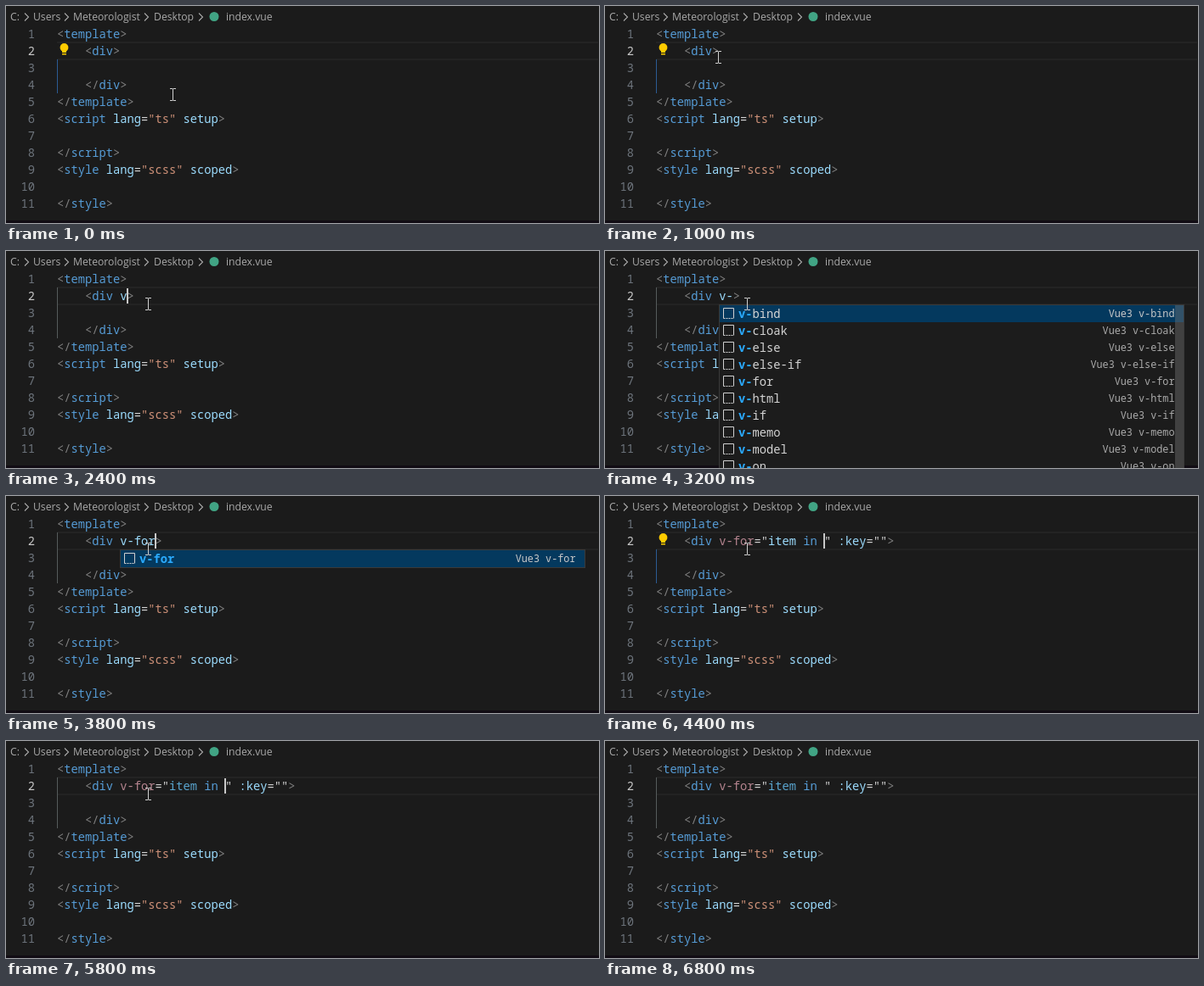
An HTML page with a canvas for the animation above (7 s loop, 698 by 256 pixels).

```html
<!DOCTYPE html>
<html lang="en">
<head>
<meta charset="utf-8">
<title>Directive completion</title>
<style>
  html, body { margin: 0; width: 100%; height: 100%; overflow: hidden; background: #1b1b1b; }
  canvas { display: block; }
</style>
</head>
<body>
<canvas id="stage" width="698" height="256"></canvas>
<script>
const ctx = document.getElementById('stage').getContext('2d');
const LOOP = 7000, STEP = 200;
const PITCH = 8.25, ROW = 20, LEFT = 60;
const FOCUS_LOST = 6400;
const MONO = '"Noto Sans Mono", monospace';
const CODE = `500 13.75px ${MONO}`;
const C = {
  bg: '#1b1b1b', edge: '#110c14', line: '#232323', punct: '#808080', tag: '#569cd6',
  attr: '#9cdcfe', string: '#ce9178', plain: '#d4d4d4', keyword: '#b5848f',
  number: '#6d747c', active: '#c6c6c6', crumb: '#a9a9a9', match: '#2aaaff'
};
const LINES = [
  '<template>', '', '', '    </div>', '</template>',
  '<script lang="ts" setup>', '', '<\/script>',
  '<style lang="scss" scoped>', '', '</style>'
];
const DIRECTIVES = ['bind', 'cloak', 'else', 'else-if', 'for', 'html', 'if', 'memo', 'model', 'on']
  .map(name => 'v-' + name);

function rect(x, y, w, h, color) {
  ctx.fillStyle = color;
  ctx.fillRect(x, y, w, h);
}

function text(value, x, y, color, font = CODE, align = 'left') {
  ctx.font = font;
  ctx.textAlign = align;
  ctx.fillStyle = color;
  ctx.fillText(value, x, y);
}

function stroke(color, width, points) {
  ctx.strokeStyle = color;
  ctx.lineWidth = width;
  ctx.beginPath();
  points.forEach(([x, y], i) => i ? ctx.lineTo(x, y) : ctx.moveTo(x, y));
  ctx.stroke();
}

function disc(x, y, r, color) {
  ctx.fillStyle = color;
  ctx.beginPath();
  ctx.arc(x, y, r, 0, 2 * Math.PI);
  ctx.fill();
}

const baseline = row => 38 + ROW * row;
const columnX = col => LEFT + PITCH * col;

function drawTokens(tokens, row) {
  let col = 0;
  for (const [value, color] of tokens) {
    if (value.trim()) text(value, columnX(col), baseline(row), color);
    col += value.length;
  }
}

function tokenize(source) {
  let afterBracket = false;
  return source.match(/<\/?|>|"[^"]*"|=|\s+|[\w:-]+/g)?.map(part => {
    let color = afterBracket ? C.tag : C.attr;
    if (/^[<>]/.test(part)) color = C.punct;
    else if (part[0] === '"') color = C.string;
    else if (part === '=') color = C.plain;
    afterBracket = part[0] === '<';
    return [part, color];
  }) ?? [];
}

function loopTokens(t) {
  return [
    ['    ', ''], ['<', C.punct], ['div', C.tag], [' ', ''], ['v-for', C.keyword],
    ['="', C.plain], ['item', t < 5400 ? C.attr : '#5aa5cf'], [' ', ''], ['in', C.tag],
    [' ', ''], ['"', C.plain], [' ', ''], [':key', C.attr], ['=""', C.plain], ['>', C.punct]
  ];
}

function drawBreadcrumb() {
  const font = '12.2px "Open Sans", sans-serif';
  const parts = [['C:', 5], ['Users', 32], ['Meteorologist', 79], ['Desktop', 174], ['index.vue', 259]];
  parts.forEach(([label, x]) => text(label, x, 17, C.crumb, font));
  for (const x of [22, 69, 163, 227]) stroke(C.crumb, 1.1, [[x, 8.5], [x + 4.5, 13], [x, 17.5]]);
  disc(245, 12.5, 5.5, '#41a484');
}

function drawBulb() {
  disc(68.5, 49, 4.9, '#ffcc00');
  rect(66, 52, 5, 3, '#ffcc00');
  rect(66, 56, 5, 1.5, '#ffcc00');
}

function typedAttribute(t) {
  if (t < 2200) return '';
  const stages = [[3800, ' v-for'], [3600, ' v-fo'], [3400, ' v-f'], [2800, ' v-'], [2400, ' v'], [2200, ' ']];
  return stages.find(([start]) => t >= start)[1];
}

// Each edit restarts the half-second blink.
function caretVisible(t) {
  const edits = [1300, 2100, 2300, 2700, 3350, 3550, 3750, 4350];
  const last = edits.filter(edit => edit <= t).pop();
  return t < FOCUS_LOST && last !== undefined && (t - last) % 1000 < 500;
}

function drawEditor(t, typed) {
  const inserted = t >= 4400;
  const bulb = t < 2200 || (inserted && t < 5200);
  rect(LEFT, 42, 637, 2, C.line);
  rect(LEFT, 62, 637, 2, C.line);
  LINES.forEach((source, row) => {
    text(row + 1, 34, baseline(row), row === 1 ? C.active : C.number, CODE, 'right');
    drawTokens(tokenize(source), row);
  });
  rect(60, bulb ? 63 : 43, 1, bulb ? 40 : 60, bulb ? '#2c5b94' : '#555b5b');
  drawTokens(inserted ? loopTokens(t) : tokenize(`    <div${typed}>`), 1);
  if (bulb) drawBulb();
  if (caretVisible(t)) {
    const col = inserted ? 24 : 8 + typed.length;
    rect(Math.round(columnX(col)) - 1, 44, 2, 18, '#c8c8c8');
  }
}

function drawSnippetIcon(x, y) {
  const color = '#d0d0d0', size = 12;
  stroke(color, 1, [[x, y + size], [x, y], [x + size, y], [x + size, y + size]]);
  ctx.setLineDash([2, 1]);
  stroke(color, 1, [[x, y + size], [x + size, y + size]]);
  ctx.setLineDash([]);
}

function matches(query) {
  if (query.length < 3) return DIRECTIVES;
  const tail = query.slice(2);
  return DIRECTIVES.filter(name => name.includes(tail, 2))
    .sort((a, b) => b.startsWith(query) - a.startsWith(query) || a.length - b.length);
}

function drawPopup(query) {
  const items = matches(query);
  const height = items.length * ROW + 2;
  rect(134, 63, 548, height, '#3a3a3a');
  rect(135, 64, 546, height - 2, '#1c1c1c');
  rect(135, 64, 546, ROW, '#04395e');
  if (63 + height > 256) rect(671, 64, 10, height - 2, 'rgba(121, 121, 121, 0.4)');
  items.forEach((name, i) => {
    const y = 79 + i * ROW;
    const hit = name.startsWith(query) ? query.length : 2;
    drawSnippetIcon(139.5, y - 11.5);
    text(name.slice(0, hit), 157, y, C.match, `bold 13.75px ${MONO}`);
    text(name.slice(hit), 157 + hit * PITCH, y, '#d4d4d4');
    text('Vue3 ' + name, 670.5, y - 1, i ? '#aaaaaa' : '#c8c8c8', `500 11.8px ${MONO}`, 'right');
  });
}

function pointerAt(t) {
  const ease = p => p * p * (3 - 2 * p);
  const progress = (start, end) => ease(Math.min(1, Math.max(0, (t - start) / (end - start))));
  const a = progress(0, 1000), b = progress(1400, 2000);
  return [196 - 63 * a + 34 * b, 104 - 44 * a + 2 * b];
}

function drawPointer(t) {
  if (t >= FOCUS_LOST) return;
  const [x, y] = pointerAt(t).map(v => Math.round(v) + 0.5);
  const color = '#d0d0d0';
  stroke(color, 1, [[x, y - 7], [x, y + 7]]);
  for (const end of [-7, 7]) {
    stroke(color, 1, [[x - 3.5, y + end], [x - 0.5, y + end]]);
    stroke(color, 1, [[x + 0.5, y + end], [x + 3.5, y + end]]);
  }
}

function draw(t) {
  const typed = typedAttribute(t);
  rect(0, 0, 698, 256, C.bg);
  drawBreadcrumb();
  drawEditor(t, typed);
  rect(0, 253, 698, 3, C.edge);
  if (t >= 2600 && t < 4400) drawPopup(typed.trim());
  drawPointer(t);
}

const origin = performance.now();
function tick() {
  const t = (performance.now() - origin) % LOOP;
  draw(Math.floor(t / STEP) * STEP);
  requestAnimationFrame(tick);
}
tick();
</script>
</body>
</html>
```
